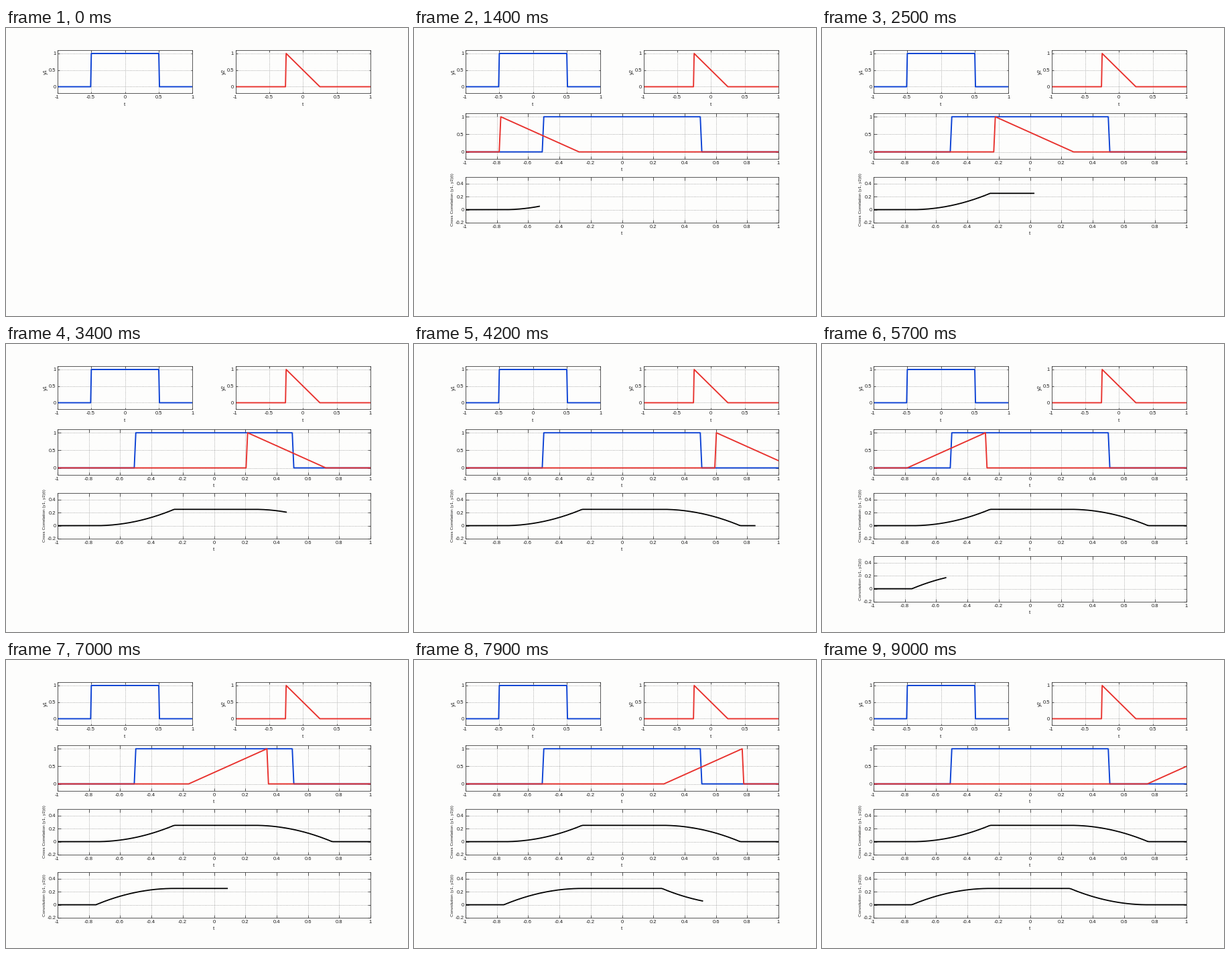
A matplotlib script for the animation above (9.1 s loop, 600 by 429 pixels).

```python
import matplotlib.pyplot as plt
import numpy as np
from matplotlib.animation import FuncAnimation

W, H, DPI = 600, 429, 64
FRAMES, STEP_MS = 91, 100
BLUE, RED, BLACK = "#0a40d4", "#e8312d", "#000000"
INK, FRAME, GRID = "#1c1c1c", "#333333", "#858585"
PAPER = "#fdfdfc"
EDGE = 0.01  # width of the slanted jump in the sampled signals

plt.rcParams["font.family"] = "Liberation Sans"
fig = plt.figure(figsize=(W / DPI, H / DPI), dpi=DPI, facecolor=PAPER)


def pt(px):
    return px * 72 / DPI


def write(ax, x, y, s, size=7.6, **kw):
    """Text placed in stage pixels, y pointing down."""
    ax.text(x / W, 1 - y / H, s, transform=fig.transFigure,
            fontsize=pt(size), color=INK, **kw)


def panel(left, top, right, bottom, xticks, yticks, ylim, ylabel,
          label_x, label_size=7.6, tick=4.5):
    ax = fig.add_axes([left / W, 1 - bottom / H,
                       (right - left) / W, (bottom - top) / H])
    ax.set(xlim=(-1, 1), ylim=ylim, xticks=xticks, yticks=yticks,
           facecolor=PAPER)
    ax.tick_params(direction="in", length=pt(tick), width=pt(0.8), color=FRAME,
                   top=True, right=True, labelbottom=False, labelleft=False)
    ax.grid(color=GRID, lw=pt(0.8), ls=(0, (1, 1.8)))
    ax.set_axisbelow(True)
    for spine in ax.spines.values():
        spine.set(linewidth=pt(0.8), color=FRAME)

    for v in xticks:
        x = left + (v + 1) / 2 * (right - left) - (v < 0)
        write(ax, x, bottom + 7.8, f"{v:g}", ha="center")
    lo, hi = ylim
    for v in yticks:
        y = bottom - (v - lo) / (hi - lo) * (bottom - top)
        write(ax, left - 2.5, y + 2.5, f"{v:g}", ha="right")
    write(ax, (left + right) / 2 - 0.5, bottom + 18.3, "t", ha="center")
    write(ax, label_x, (top + bottom) / 2, ylabel, label_size,
          rotation=90, ha="center", va="center")
    return ax


def curve(ax, color, xy=((), ()), width=1.9):
    return ax.plot(*xy, color=color, lw=pt(width), solid_joinstyle="round",
                   solid_capstyle="butt")[0]


def box_signal():
    return [-1, -0.5 - EDGE, -0.5, 0.5, 0.5 + EDGE, 1], [0, 0, 1, 1, 0, 0]


def ramp_signal(shift=0, flip=False):
    x = np.array([-3, -0.25 - EDGE, -0.25, 0.25, 3])
    y = np.array([0, 0, 1, 0, 0])
    if flip:
        x, y = -x[::-1], y[::-1]
    return x + shift, y


def correlation(t):
    # the slanted jumps widen the box by half an edge on each side
    rise = np.clip(t + 0.75 + EDGE / 2, 0, 0.5) ** 2
    fall = np.clip(t - 0.25 - EDGE / 2, 0, 0.5) ** 2
    return rise - fall


def convolution(t):
    return correlation(-t)


coarse = [-1, -0.5, 0, 0.5, 1]
fine = [round(-1 + 0.2 * i, 1) for i in range(11)]
halves, fifths = [0, 0.5, 1], [-0.2, 0, 0.2, 0.4]

top_left = panel(77, 33, 278.4, 97.4, coarse, halves, (-0.2, 1.1), "y1", 59, tick=2.5)
top_right = panel(342.6, 33, 544, 97.4, coarse, halves, (-0.2, 1.1), "y2", 325, tick=2.5)
overlap = panel(77, 127, 544, 195, fine, halves, (-0.2, 1.1), "", 59)
corr = panel(77, 222, 544, 290, fine, fifths, (-0.2, 0.5),
             "Cross Correlation (y1, y2)(t)", 58, 6.35)
conv = panel(77, 316, 544, 384, fine, fifths, (-0.2, 0.5),
             "Convolution (y1, y2)(t)", 58, 6.35)

curve(top_left, BLUE, box_signal())
curve(top_right, RED, ramp_signal())
curve(overlap, BLUE, box_signal())
slider = curve(overlap, RED)
corr_line = curve(corr, BLACK, width=1.8)
conv_line = curve(conv, BLACK, width=1.8)

SWEEP_1, SWEEP_2 = 3, 48


def shift_at(i):
    if i < SWEEP_2:
        return np.interp(i, [3, 5, 14, 25, 42, 45, 46],
                         [-1, -0.967, -0.525, 0.028, 0.853, 0.998, 1])
    return np.interp(i, [48, 57, 70, 89, 90],
                     [-0.963, -0.535, 0.088, 0.996, 1])


def trace(line, func, end):
    t = np.linspace(-1, end, 201)
    line.set_data(t, func(t))


def update(i):
    second = i >= SWEEP_2
    for ax in (overlap, corr):
        ax.set_visible(i >= SWEEP_1)
    conv.set_visible(second)

    shift = shift_at(i)
    slider.set_data(*ramp_signal(shift, flip=second))
    trace(corr_line, correlation, 1 if second else shift)
    trace(conv_line, convolution, shift if second else -1)
    return slider, corr_line, conv_line


anim = FuncAnimation(fig, update, frames=FRAMES, interval=STEP_MS,
                     init_func=lambda: update(0), repeat=True, repeat_delay=0,
                     blit=False)
plt.show()
```
